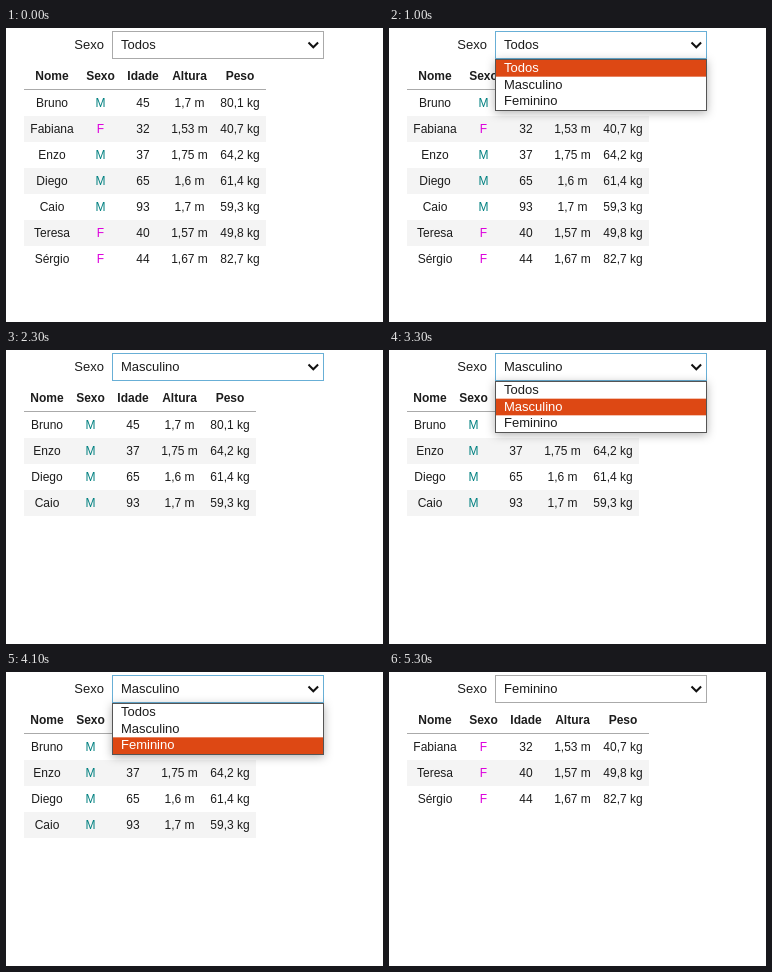
Recreate the animation shown at these times as an HTML page. Size 377x294 px, loop 5.4 s.

```html
<!DOCTYPE html>
<html lang="pt">
<head>
<meta charset="utf-8">
<style>
html, body { margin: 0; height: 100%; overflow: hidden; background: #fff; }
svg { display: block; font: 12px "Liberation Sans", Arial, sans-serif; fill: #1c1c1c; }
.ui { font-size: 13px; }
.mid { text-anchor: middle; }
.head { font-weight: bold; }
#popup { filter: drop-shadow(0 2px 5px rgba(0, 0, 0, .3)); }
</style>
</head>
<body>
<svg id="stage" width="377" height="294"></svg>
<script>
const options = ['Todos', 'Masculino', 'Feminino'];
const head = ['Nome', 'Sexo', 'Idade', 'Altura', 'Peso'];
const people = [
  ['Bruno', 'M', '45', '1,7 m', '80,1 kg'],
  ['Fabiana', 'F', '32', '1,53 m', '40,7 kg'],
  ['Enzo', 'M', '37', '1,75 m', '64,2 kg'],
  ['Diego', 'M', '65', '1,6 m', '61,4 kg'],
  ['Caio', 'M', '93', '1,7 m', '59,3 kg'],
  ['Teresa', 'F', '40', '1,57 m', '49,8 kg'],
  ['Sérgio', 'F', '44', '1,67 m', '82,7 kg']
];
const sexColor = { M: '#008080', F: '#dd00dd' };
const NONE = -1, BLANK = -2; // no popup, popup not painted yet

// start time, selected option, table filter, hovered option, focus
const steps = [
  [0, 0, 0, NONE, false],
  [900, 0, 0, BLANK, true],
  [1000, 0, 0, 0, true],
  [1600, 0, 0, 1, true],
  [2200, 1, 0, NONE, true],
  [2300, 1, 1, NONE, true],
  [3300, 1, 1, 1, true],
  [3500, 1, 1, 0, true],
  [3600, 1, 1, 1, true],
  [4100, 1, 1, 2, true],
  [4400, 2, 1, NONE, true],
  [4500, 2, 2, NONE, true],
  [5300, 2, 2, NONE, false]
];
const LOOP = 5400;

const rect = (x, y, w, h, fill, extra = '') =>
  `<rect x="${x}" y="${y}" width="${w}" height="${h}" fill="${fill}" ${extra}/>`;
const text = (x, y, str, extra = '') => `<text x="${x}" y="${y}" ${extra}>${str}</text>`;

function table(filter) {
  const narrow = filter === 1 ? 10 : 0;
  const centers = [46 - narrow / 2, ...[94.5, 137, 183.5, 234].map(x => x - narrow)];
  const width = 242 - narrow;
  const rows = people.filter(p => !filter || p[1] === 'MF'[filter - 1]);
  let out = head.map((h, i) => text(centers[i], 52, h, 'class="mid head"')).join('');
  out += rect(18, 61, width, 1, '#aaa');
  rows.forEach((row, r) => {
    const y = 62 + r * 26;
    if (r % 2) out += rect(18, y, width, 26, '#f4f4f4');
    row.forEach((cell, i) => {
      const color = i === 1 ? `fill="${sexColor[cell]}"` : '';
      out += text(centers[i], y + 17, cell, `class="mid" ${color}`);
    });
  });
  return out;
}

function select(chosen, focus) {
  const border = focus ? '#68afd6' : '#aaa';
  return text(98, 21, 'Sexo', 'class="ui" text-anchor="end"') +
    rect(106.5, 3.5, 211, 27, '#fff', `stroke="${border}"`) +
    text(115, 21, options[chosen], 'class="ui"') +
    '<path d="M302.5 14.5l4.8 4.8 4.8-4.8" fill="none" stroke="#111" stroke-width="2"/>';
}

function popup(hover) {
  if (hover === NONE) return '';
  if (hover === BLANK) return `<g id="popup">${rect(106, 31, 212, 52, '#3c3c3c')}</g>`;
  const itemH = 50 / 3;
  const items = options.map((o, i) =>
    (i === hover ? rect(107, 32 + i * itemH, 210, itemH, '#dd4814') : '') +
    text(115, Math.round(44 + i * itemH), o, `class="ui" ${i === hover ? 'fill="#fff"' : ''}`));
  return `<g id="popup">${rect(106.5, 31.5, 211, 51, '#fff', 'stroke="#555"')}${items.join('')}</g>`;
}

const stage = document.getElementById('stage');
let shown;

function frame(now) {
  const t = now % LOOP;
  const step = steps.findLast(s => s[0] <= t) || steps[0];
  if (step !== shown) {
    shown = step;
    const [, chosen, filter, hover, focus] = step;
    stage.innerHTML = table(filter) + select(chosen, focus) + popup(hover);
  }
  requestAnimationFrame(frame);
}
frame(performance.now());
</script>
</body>
</html>
```
